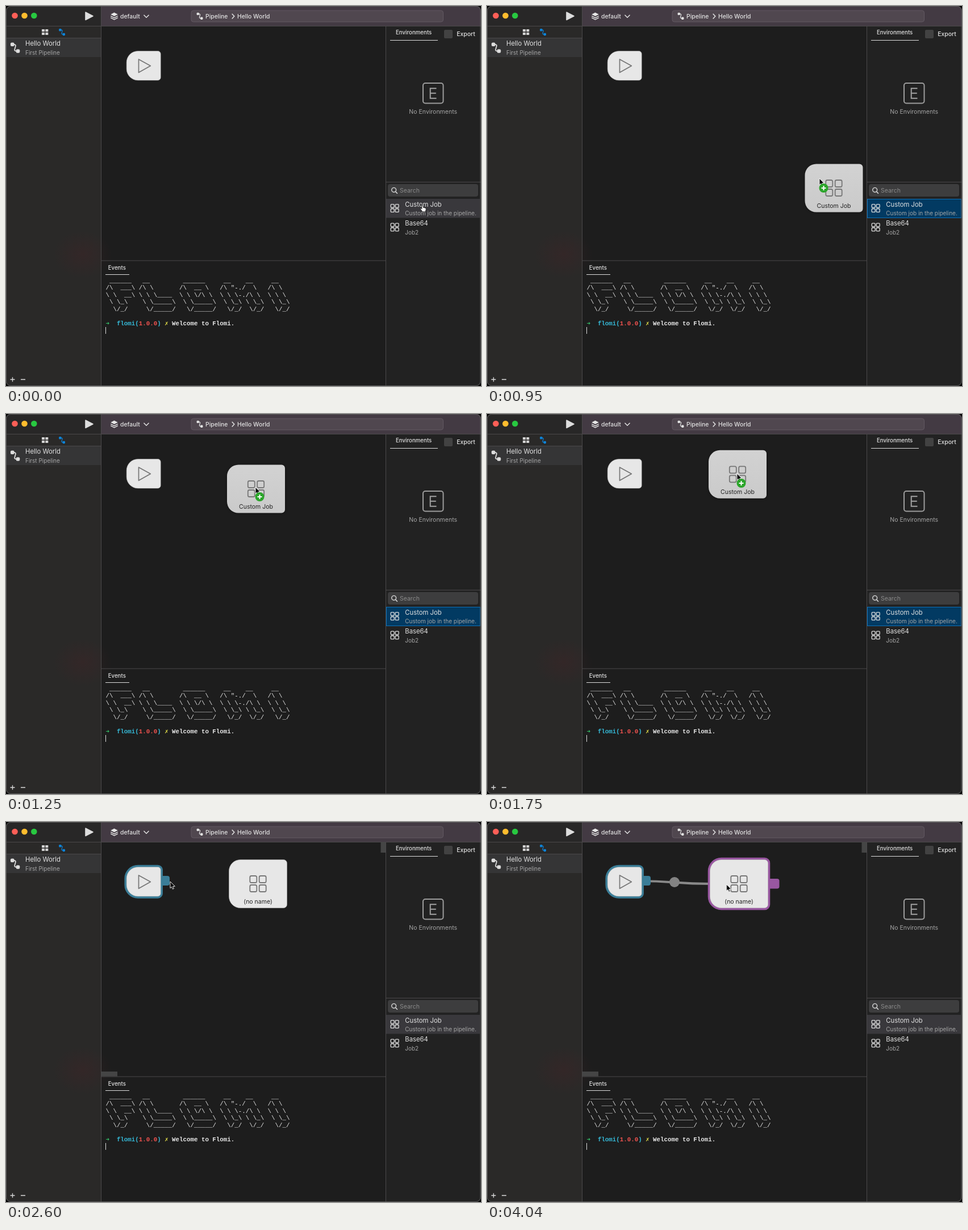
Recreate the animation shown at these times as an HTML page. Size 836 by 670 pixels, loop 4140 ms.

```html
<!DOCTYPE html>
<html lang="en">
<head>
<meta charset="utf-8">
<title>Pipeline editor</title>
<style>
html, body { margin: 0; width: 100%; height: 100%; overflow: hidden; background: #000; }
svg { position: absolute; left: 0; top: 0; display: block; }
text { font-family: Inter, "Open Sans", sans-serif; font-size: 10.5px; fill: #e2e2e2; }
.name { font-size: 11.3px; }
.note { font-size: 10px; fill: #a5a5a5; }
.tab { font-size: 9.7px; font-weight: 500; }
.bold { font-size: 10.4px; font-weight: 500; }
.mid { text-anchor: middle; }
.dark { fill: #222; }
pre {
  position: absolute; left: 175.5px; top: 478.7px; margin: 0; color: #e6e6e6;
  font: 10.8px/12.5px "Liberation Mono", "DejaVu Sans Mono", monospace;
}
pre b { position: absolute; top: 75px; white-space: pre; }

/* one shared clock: 4140 ms per loop; moves advance every 50 ms */
.a { animation: 4140ms linear infinite; }
.cut { animation-timing-function: step-end; visibility: hidden; }

#hand { animation-name: hand; }
@keyframes hand { 0% { visibility: visible } 15.69%, 100% { visibility: hidden } }
#arrow { animation-name: arrow; }
@keyframes arrow { 0% { visibility: hidden } 15.69%, 100% { visibility: visible } }
#picked { animation-name: picked; }
@keyframes picked { 0% { visibility: hidden } 7.24% { visibility: visible } 45.88%, 100% { visibility: hidden } }
.drag { animation-name: drag; }
@keyframes drag { 0% { visibility: hidden } 19.31% { visibility: visible } 45.88%, 100% { visibility: hidden } }
.dropped { animation-name: dropped; }
@keyframes dropped { 0% { visibility: hidden } 45.88%, 100% { visibility: visible } }
.blue { animation-name: blue; }
@keyframes blue { 0% { visibility: hidden } 53.12%, 100% { visibility: visible } }
.wire { animation-name: wire; }
@keyframes wire { 0% { visibility: hidden } 76.07%, 100% { visibility: visible } }
#plug { animation-name: plug; }
@keyframes plug { 0% { visibility: hidden } 76.07% { visibility: visible } 85.73%, 100% { visibility: hidden } }
.purple { animation-name: purple; }
@keyframes purple { 0% { visibility: hidden } 85.73%, 100% { visibility: visible } }

#pointer { animation-name: pointer; }
@keyframes pointer {
  0%, 19.31% { transform: translate(729px, 353px); animation-timing-function: steps(3) }
  22.93% { transform: translate(585px, 304px); animation-timing-function: steps(2) }
  25.35% { transform: translate(507px, 213px); animation-timing-function: steps(4) }
  30.18%, 32.59% { transform: translate(439px, 129px); animation-timing-function: steps(8) }
  42.26% { transform: translate(440px, 105px); animation-timing-function: steps(2) }
  44.67%, 47.09% { transform: translate(442px, 107px); animation-timing-function: steps(6) }
  54.33% { transform: translate(264px, 105px); animation-timing-function: steps(3) }
  57.96% { transform: translate(284px, 105px); animation-timing-function: steps(4) }
  62.79%, 76.07% { transform: translate(289px, 105px); animation-timing-function: steps(4) }
  80.9% { transform: translate(353px, 106px); animation-timing-function: steps(3) }
  84.53%, 94.19% { transform: translate(420px, 111px); animation-timing-function: steps(3) }
  97.57%, 100% { transform: translate(421.5px, 110px) }
}
#ghost { animation-name: ghost; }
@keyframes ghost {
  0%, 19.31% { transform: translate(748px, 357px); animation-timing-function: steps(3) }
  22.93% { transform: translate(610.5px, 321px); animation-timing-function: steps(2) }
  25.35% { transform: translate(516px, 220px); animation-timing-function: steps(4) }
  30.18%, 32.59% { transform: translate(440px, 132px); animation-timing-function: steps(8) }
  42.26% { transform: translate(441px, 106.3px); animation-timing-function: steps(2) }
  44.67%, 100% { transform: translate(443px, 108.5px) }
}
#plugPos { animation-name: plugPos; }
@keyframes plugPos {
  0%, 76.07% { transform: translate(276px, 104px); animation-timing-function: steps(4) }
  80.9% { transform: translate(340px, 107.8px); animation-timing-function: steps(3) }
  84.53%, 100% { transform: translate(407px, 112px) }
}
#link { animation-name: link; }
@keyframes link {
  0%, 76.07% { d: path("M267 104C267 104 267 104 267 104"); animation-timing-function: steps(4) }
  80.9% { d: path("M267 104C299 104 299 107.5 331 107.5"); animation-timing-function: steps(3) }
  84.53% { d: path("M267 104C332 104 332 112 398 112"); animation-timing-function: step-end }
  85.73%, 100% { d: path("M267 104C330 104 330 109 393 109") }
}
#dot { animation-name: dot; }
@keyframes dot {
  0%, 76.07% { transform: translate(267px, 104px); animation-timing-function: steps(4) }
  80.9% { transform: translate(299px, 105.2px); animation-timing-function: steps(3) }
  84.53% { transform: translate(332.5px, 108px); animation-timing-function: step-end }
  85.73%, 100% { transform: translate(330px, 106px) }
}
</style>
</head>
<body>
<svg width="836" height="670" viewBox="0 0 836 670">
  <defs>
    <radialGradient id="glow">
      <stop offset="0" stop-color="#452326" stop-opacity=".35"/>
      <stop offset="1" stop-color="#452326" stop-opacity="0"/>
    </radialGradient>
    <linearGradient id="paper" x2="0" y2="1">
      <stop offset="0" stop-color="#d2d2d2"/><stop offset="1" stop-color="#cacaca"/>
    </linearGradient>
    <clipPath id="frame"><rect width="836" height="670" rx="8"/></clipPath>
    <path id="card" d="M-31-42.5H45a6 6 0 0 1 6 6V36.5a6 6 0 0 1-6 6H-31a20 20 0 0 1-20-20V-22.5a20 20 0 0 1 20-20Z"/>
    <path id="start" d="M-10-25.7H25a5 5 0 0 1 5 5V20.7a5 5 0 0 1-5 5H-10a20 20 0 0 1-20-20V-5.7a20 20 0 0 1 20-20Z"/>
    <g id="grid" fill="none">
      <rect x="-14.2" y="-14" width="12" height="12" rx="2.5"/><rect x="2.2" y="-14" width="12" height="12" rx="2.5"/>
      <rect x="-14.2" y="2" width="12" height="12" rx="2.5"/><rect x="2.2" y="2" width="12" height="12" rx="2.5"/>
    </g>
    <g id="pipe">
      <rect x="-4.9" y="-6" width="4.4" height="4.4" rx="1.4"/>
      <rect x="1.6" y="1.8" width="4.4" height="4.4" rx="1.4"/>
      <path d="M-1-3.8Q1.6-3.8 1-1.6L0 1.8Q-.6 4 2 4" fill="none" stroke="currentColor" stroke-width="1.2"/>
    </g>
  </defs>

  <g clip-path="url(#frame)">
    <rect width="836" height="670" fill="#1d1d1d"/>
    <rect width="167" height="670" fill="#2a2928"/>
    <ellipse cx="135" cy="438" rx="52" ry="42" fill="url(#glow)"/>
    <rect width="167" height="35" fill="#282727"/>
    <rect y="57" width="167" height="33" fill="#353536"/>
    <rect x="168" width="668" height="35" fill="#433a43"/>
    <rect x="669" y="35" width="167" height="635" fill="#222"/>
    <path d="M0 35.5H836M0 56.5H167M167.5 0V670M668.5 35V670M168 449H668M669 310.5H836" stroke="#4b494a" fill="none"/>
  </g>

  <!-- sidebar -->
  <circle cx="15.5" cy="17" r="5.3" fill="#fe5f57"/>
  <circle cx="32.5" cy="17" r="5.3" fill="#febc2e"/>
  <circle cx="49.3" cy="17" r="5.3" fill="#28c840"/>
  <path d="M140 11V24.5L153 17.7Z" fill="#ddd" stroke="#ddd" stroke-width="1.6" stroke-linejoin="round"/>
  <path d="M63 41h5v4.3h-5zM69.3 41h5v4.3h-5zM63 46.8h5v4.3h-5zM69.3 46.8h5v4.3h-5z" fill="#d2d2d2"/>
  <use href="#pipe" x="98" y="46" fill="#0d84d9" color="#0d84d9"/>
  <use href="#pipe" transform="translate(15.3 73.5) scale(1.5)" fill="#ddd" color="#ddd"/>
  <text class="name" x="34" y="70">Hello World</text>
  <text class="note" x="34" y="86">First Pipeline</text>
  <path d="M7.5 658.5h8M11.5 654.5v8M26 658.5h8" stroke="#ddd" stroke-width="1.3"/>

  <!-- toolbar -->
  <g fill="#e6e6e6">
    <path d="M190.5 11.5l6.3 3.2-6.3 3.2-6.3-3.2z"/>
    <path d="M184.2 17.7l6.3 3.2 6.3-3.2M184.2 20.7l6.3 3.2 6.3-3.2" fill="none" stroke="#e6e6e6" stroke-width="1.4"/>
  </g>
  <text class="bold" x="201" y="21.7">default</text>
  <path d="M242.5 15.7l4.5 4.5 4.5-4.5" fill="none" stroke="#e2e2e2" stroke-width="1.5"/>
  <rect x="326" y="8" width="443.5" height="20" rx="4" fill="#50474f" stroke="#625962"/>
  <use href="#pipe" x="340.5" y="17.7" fill="#e2e2e2" color="#e2e2e2"/>
  <text class="bold" x="351" y="21.7">Pipeline</text>
  <path d="M397.7 13.8l4.1 4.3-4.1 4.3" fill="none" stroke="#e2e2e2" stroke-width="1.5"/>
  <text class="bold" x="407" y="21.7">Hello World</text>

  <!-- inspector -->
  <text class="tab" x="686" y="50">Environments</text>
  <path d="M676 60.5H760M175 473.5H217" stroke="#ddd"/>
  <rect x="771" y="42" width="15" height="15" rx="2" fill="#424242"/>
  <text class="bold" x="793.3" y="53">Export</text>
  <rect x="734" y="136" width="35.5" height="35.5" rx="4" fill="none" stroke="#9c9c9c" stroke-width="2"/>
  <path d="M757.5 145.2H746.7V162.8H757.5M746.7 153.8H756.8" fill="none" stroke="#a2a2a2" stroke-width="2"/>
  <text class="mid" x="751.7" y="189.7" style="fill:#a5a5a5">No Environments</text>
  <rect x="672" y="314" width="159" height="22" rx="4" fill="#3d3d3e"/>
  <circle cx="682.7" cy="324.3" r="3.9" fill="none" stroke="#ddd" stroke-width="1.4"/>
  <path d="M685.5 327.3l3.4 3.4" stroke="#ddd" stroke-width="1.6"/>
  <text x="693" y="329" style="fill:#8b8b8b">Search</text>
  <rect x="669" y="340" width="165" height="33.5" fill="#39383c"/>
  <rect id="picked" class="a cut" x="669.5" y="340.5" width="165" height="33" fill="#023a62" stroke="#0c70b8"/>
  <g stroke="#dedede" stroke-width="2.7">
    <use href="#grid" transform="translate(684.2 356.5) scale(.49)"/>
    <use href="#grid" transform="translate(684.2 390) scale(.49)"/>
  </g>
  <text class="name" x="702.3" y="353.5">Custom Job</text>
  <text class="note" x="702.3" y="369.2">Custom job in the pipeline.</text>
  <text class="name" x="702.3" y="387">Base64</text>
  <text class="note" x="702.3" y="402.5">Job2</text>

  <text class="tab" x="179.7" y="464.7">Events</text>
  <path d="M175.5 566V578" stroke="#ddd"/>

  <!-- canvas -->
  <path class="a cut dropped" d="M659.5 35.5h8.5v18.5h-8.5zM168 440h28v8.5h-28z" fill="#454545"/>
  <g class="a cut wire">
    <path id="link" class="a" d="M267 104C330 104 330 109 393 109" fill="none" stroke="#8a8a8a" stroke-width="4"/>
    <circle id="dot" class="a" r="9" fill="#838383"/>
  </g>
  <g class="a cut blue" fill="#3a7d97">
    <rect x="268" y="95" width="20" height="17" rx="4"/>
    <use href="#start" x="242.2" y="105.2" stroke="#3a7d97" stroke-width="7.5"/>
  </g>
  <use href="#start" x="242.2" y="105.2" fill="#e7e7e7" stroke="#bbb" stroke-width=".6"/>
  <path d="M233.5 94V117.3L254.3 105.6Z" fill="none" stroke="#757575" stroke-width="1.7" stroke-linejoin="round"/>

  <g transform="translate(443.5 109)">
    <g class="a cut purple" fill="#9957a1">
      <rect x="48" y="-9" width="23" height="17.5" rx="4"/>
      <use href="#card" stroke="#9957a1" stroke-width="7.5"/>
    </g>
    <g class="a cut dropped">
      <use href="#card" fill="#e7e7e7" stroke="#bbb" stroke-width=".6"/>
      <use href="#grid" stroke="#777" stroke-width="1.8"/>
      <text class="mid dark" y="34.7">(no name)</text>
    </g>
  </g>

  <g id="plug" class="a cut">
    <rect id="plugPos" class="a" x="-9" y="-9" width="18" height="18" rx="4" fill="#e7e7e7" stroke="#bbb" stroke-width=".6"/>
  </g>

  <g class="a cut drag">
    <g id="ghost" class="a">
      <use href="#card" fill="url(#paper)" style="filter:drop-shadow(0 1px 2px #0005)"/>
      <use href="#grid" stroke="#777" stroke-width="1.8"/>
      <text class="mid dark" y="34.7">Custom Job</text>
    </g>
  </g>

  <!-- pointers -->
  <path id="hand" class="a cut" d="M731.2 351.5q1.3-1.4 2.2.2l.8 3.4 4 1.1q1.4.6 1 2.4l-.9 4.2h-5.2l-3.6-4.7q-.4-1.6 1.2-1.4l1.4 1z"
    fill="#fff" stroke="#111" stroke-width=".8"/>
  <g id="pointer" class="a">
    <path id="arrow" class="a cut" d="M0 0V11.6L2.6 9.2 4.4 13.3 6.4 12.4 4.7 8.4H8.3Z" fill="#000" stroke="#fff" stroke-width=".9"/>
    <g class="a cut drag">
      <circle cx="7.5" cy="17" r="8" fill="#2ba52a"/>
      <path d="M3.5 17h8M7.5 13v8" stroke="#fff" stroke-width="2"/>
    </g>
  </g>

  <rect x=".5" y=".5" width="834.5" height="669" rx="8" fill="none" stroke="#595959"/>
</svg>
<pre> ______   __         ______     __    __     __
/\  ___\ /\ \       /\  __ \   /\ "-./  \   /\ \
\ \  __\ \ \ \____  \ \ \/\ \  \ \ \-./\ \  \ \ \
 \ \_\    \ \_____\  \ \_____\  \ \_\ \ \_\  \ \_\
  \/_/     \/_____/   \/_____/   \/_/  \/_/   \/_/
<b style="left:0;color:#35c46a">➜</b><b style="left:19.4px;color:#35b8d6">flomi(<span style="color:#f0524f">1.0.0</span>)</b><b style="left:103.7px;color:#e5e04a">✗</b><b style="left:116.6px">Welcome to Flomi.</b></pre>
</body>
</html>
```
